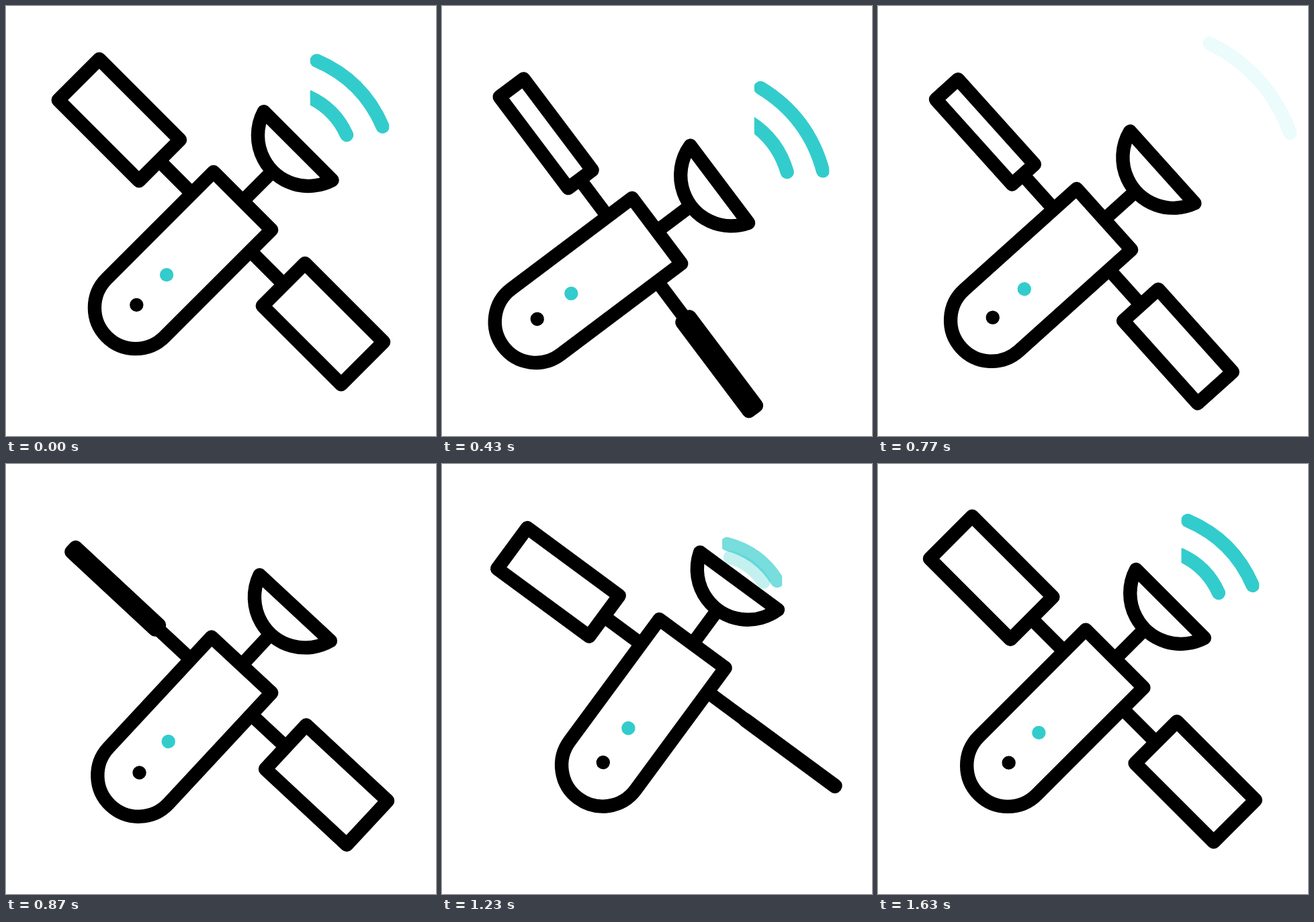
Write an HTML page with a canvas that moves like this. It is 640x640 px and loops after 1.67 s.

```html
<!DOCTYPE html>
<html lang="en">
<head>
<meta charset="utf-8">
<title>Satellite</title>
<style>
  html, body { margin: 0; width: 100%; height: 100%; overflow: hidden; background: #fff; }
  canvas { display: block; width: 100vmin; height: 100vmin; }
</style>
</head>
<body>
<canvas width="640" height="640"></canvas>
<script>
const ctx = document.querySelector('canvas').getContext('2d');
const LOOP = 1670, FRAMES = 50, BLACK = '#000', TEAL = '#33cccc';

const clamp = x => Math.min(1, Math.max(0, x));
const ramp = (from, to, t) => clamp((t - from) / (to - from));
const smooth = x => x * x * (3 - 2 * x);
const ease = (from, to, t) => smooth(ramp(from, to, t));
const mix = (a, b, k) => a + (b - a) * k;

// Eased value through [time, value] keys.
function track(keys, t) {
  let i = 1;
  while (i < keys.length - 1 && t > keys[i][0]) i++;
  const [t0, v0] = keys[i - 1], [t1, v1] = keys[i];
  return mix(v0, v1, ease(t0, t1, t));
}

function drift(t) {
  const swing = ease(16, 34, t);
  const bend = 14 * swing * (1 - swing);
  return [
    track([[0, 0], [16, -40], [34, 28], [50, 0]], t),
    track([[0, 0], [16, 44], [34, -20], [50, 0]], t) + bend
  ];
}

function tilt(t) {
  if (t < 16) return 10 * smooth((t / 16) ** 1.6);
  if (t < 34) return mix(10, -10.7, ease(16, 34, t));
  return -10.7 * smooth(((50 - t) / 16) ** 1.6);
}

const leftFold = t => track([[-1, 1], [8, 0], [18, 1], [28, 0], [40, 1], [49, 1], [58, 0]], t);
const rightFold = t => track([[4, 1], [16, 0], [26, 1], [36, 0], [50, 1]], t);

function line(x1, y1, x2, y2) {
  ctx.beginPath();
  ctx.moveTo(x1, y1);
  ctx.lineTo(x2, y2);
  ctx.stroke();
}

function dot(x, y, color) {
  ctx.fillStyle = color;
  ctx.beginPath();
  ctx.arc(x, y, 10.2, 0, 7);
  ctx.fill();
}

function panel(x1, x2, fold) {
  const half = Math.max(0.2, 44.7 * fold);
  ctx.strokeRect(x1, 44.7 - half, x2 - x1, 2 * half);
}

function satellite(t) {
  ctx.strokeStyle = BLACK;
  ctx.lineCap = 'butt';
  line(-130, 45.5, -61, 45.5);
  line(61, 44.5, 131, 44.5);
  line(0.5, 0, 0.5, -63);
  panel(-300, -130, leftFold(t));
  panel(131.5, 297, rightFold(t));

  ctx.beginPath();
  ctx.moveTo(-61, 0);
  ctx.lineTo(61, 0);
  ctx.arc(0, 225, 61, 0, Math.PI);
  ctx.closePath();
  ctx.stroke();

  const spread = Math.asin(72 / 75.3);
  ctx.beginPath();
  ctx.arc(0.6, -138.3, 75.3, Math.PI / 2 - spread, Math.PI / 2 + spread);
  ctx.closePath();
  ctx.stroke();

  const blink = t % 25;
  dot(-2, 221, BLACK);
  dot(-2, 157.7, blink >= 4 && blink < 12 ? BLACK : TEAL);
}

function wave(half, y, sag, alpha) {
  ctx.globalAlpha = alpha;
  ctx.beginPath();
  ctx.moveTo(-half, -y);
  ctx.quadraticCurveTo(0, -y - 2 * sag * half, half, -y);
  ctx.stroke();
  ctx.globalAlpha = 1;
}

function signal(t) {
  const late = t < 10 ? t + FRAMES : t;
  const leaving = t < 30;
  const innerScale = leaving && t > 2 ? 1 + 0.385 * ease(5, 23, t) : mix(0.71, 1, ease(32, 50, late));
  const outerScale = leaving && t > 2 ? 1 + 0.285 * ease(5, 25, t) : mix(0.63, 1, ease(34, 52, late));
  const innerAlpha = leaving ? 1 - ramp(16, 22, t) : ramp(35, 42, t);
  const outerAlpha = leaving ? 1 - ramp(18, 23.5, t) : ramp(33, 39, t);
  const y = 228.5 * outerScale, half = 70.2 * outerScale;

  // The waves are cut off a tenth beyond the outer wave's horizontal span.
  const m = ctx.getTransform();
  const left = -half * m.a - y * m.c + m.e, width = 2 * half * m.a;
  ctx.save();
  ctx.resetTransform();
  ctx.beginPath();
  ctx.rect(left - width * 0.1, 0, width * 1.2, 640);
  ctx.clip();
  ctx.setTransform(m);
  ctx.strokeStyle = TEAL;
  ctx.lineCap = 'round';
  wave(40.2 * innerScale, 179 * innerScale, 0.19, innerAlpha);
  wave(half, y, 0.2, outerAlpha);
  ctx.restore();
}

function draw(t) {
  const [dx, dy] = drift(t);
  ctx.resetTransform();
  ctx.clearRect(0, 0, 640, 640);
  ctx.translate(320 + dx, 320 + dy);
  ctx.rotate(tilt(t) * Math.PI / 180);
  ctx.translate(32, -30);
  ctx.rotate(Math.PI / 4);
  ctx.lineWidth = 20.4;
  ctx.lineJoin = 'round';
  signal(t);
  satellite(t);
}

const start = performance.now();
function tick() {
  const ms = (performance.now() - start) % LOOP;
  draw(Math.floor(ms / LOOP * FRAMES + 0.2) % FRAMES);
  requestAnimationFrame(tick);
}
tick();
</script>
</body>
</html>
```
